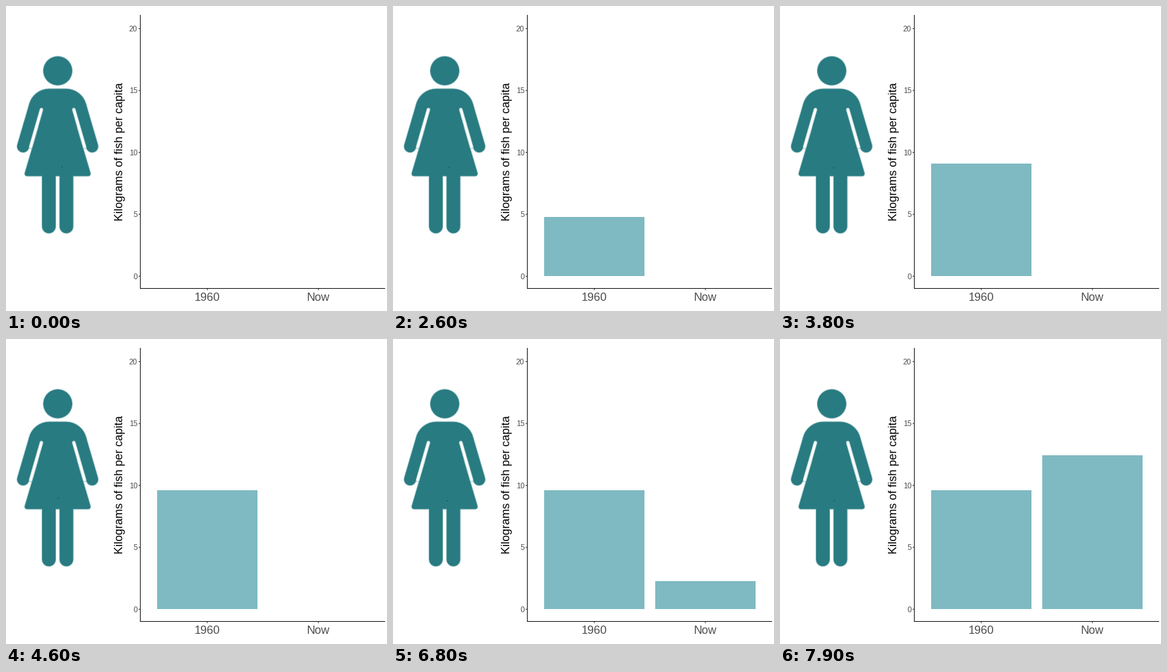
Animation, 600 px wide and 480 px high, one loop 8000 ms. Source, as a matplotlib script:

```python
import random

import matplotlib.pyplot as plt
from matplotlib.animation import FuncAnimation
from matplotlib.patches import Circle, Polygon, Rectangle

WIDTH, HEIGHT, DPI = 600, 480, 100
STEP, FRAMES = 100, 80
PX = 72 / DPI  # points per pixel
TEAL, SOFT_TEAL, BAR = "#287b81", "#9cc4c8", "#7fb9c1"
GREY, TICK = "#4d4d4d", "#333333"
BASE, UNIT, SLOT = 425.33, 19.49, 175  # zero line, px per kg, px per bar
RISE_TIME, BAR_DELAY = 4600, 5100
YEARS = {"1960": 9.6, "Now": 20.113}

plt.rcParams["font.family"] = "Liberation Sans"
fig = plt.figure(figsize=(WIDTH / DPI, HEIGHT / DPI), dpi=DPI, facecolor="white")
ax = fig.add_axes([0, 0, 1, 1])
ax.set_xlim(0, WIDTH)
ax.set_ylim(HEIGHT, 0)
ax.axis("off")


def block(x, y, width, height, color):
    """Hard-edged rectangle on whole pixels."""
    return ax.add_patch(Rectangle((x, y), width, height, fc=color, lw=0,
                                  antialiased=False))


def stroke(start, end, width, color, cap="round"):
    ax.plot(*zip(start, end), color=color, lw=width * PX,
            solid_capstyle=cap, snap=False, zorder=1)


def label(x, y, text, size, color=GREY, ha="center", rotation=0):
    ax.text(x, y, text, size=size * PX, color=color, ha=ha, va="baseline",
            rotation=rotation, rotation_mode="anchor")


def draw_axes():
    for value in range(0, 21, 5):
        y = BASE - value * UNIT
        stroke((208.8, y), (211.5, y), 1.07, TICK, "butt")
        label(207, y + 4.3, str(value), 11.8, ha="right")
    for i, year in enumerate(YEARS):
        x = 317 + i * SLOT
        stroke((x, 444.5), (x, 447.3), 1.07, TICK, "butt")
        label(x, 463.7, year, 18)
    block(211, 14, 1, 431, "black")
    block(211, 444, 386, 1, "black")
    label(183.8, 229.5, "Kilograms of fish per capita", 18, "black", rotation=90)


def draw_woman():
    center = 81.3

    def spot(side, dx, y):
        return center + side * dx, y

    # A wider pale pass below the main one leaves a soft rim.
    for color, grow in ((SOFT_TEAL, 1), (TEAL, -1)):
        ax.add_patch(Circle((center + 0.2, 102), 23 + grow / 2, fc=color, lw=0,
                            zorder=1))
        stroke(spot(-1, 13.3, 163), spot(1, 13.3, 163), 66 + grow, color)
        skirt = [spot(-1, 18.6, 164), spot(-1, 48.2, 264),
                 spot(1, 48.2, 264), spot(1, 18.6, 164)]
        ax.add_patch(Polygon(skirt, fc=color, ec=color, lw=(8 + grow) * PX,
                             joinstyle="round", zorder=1))
        for side in (-1, 1):
            stroke(spot(side, 36.5, 160), spot(side, 54.4, 221), 19.5 + grow, color)
            stroke(spot(side, 13.8, 264), spot(side, 13.8, 347), 22 + grow, color)
    for color, grow in ((SOFT_TEAL, 1), ("white", -1)):
        for side in (-1, 1):
            stroke(spot(side, 25.5, 163), spot(side, 42.5, 222), 5 + grow, color)


def ease(p):
    p = min(max(p, 0), 1)
    return 4 * p**3 if p < 0.5 else 1 - 4 * (1 - p)**3


draw_axes()
draw_woman()
bars = [block(238 + i * SLOT, 425, 158, 0, BAR) for i in range(len(YEARS))]
speck = block(0, 0, 1, 1, "#0a2022")
speck.set_zorder(3)


def update(frame):
    now = frame * STEP
    for i, (bar, value) in enumerate(zip(bars, YEARS.values())):
        progress = ease((now - 300 - i * BAR_DELAY) / RISE_TIME)
        top = round(BASE - value * UNIT * progress)
        bar.set_y(top)
        bar.set_height(425 - top)
        bar.set_visible(top < 425)
    jitter = random.Random(max(0, (now - 800) // 1900))
    speck.set_xy((jitter.randint(82, 91), jitter.randint(250, 255)))
    return [*bars, speck]


animation = FuncAnimation(fig, update, frames=FRAMES, interval=STEP,
                          repeat=True, repeat_delay=0)
plt.show()
```
